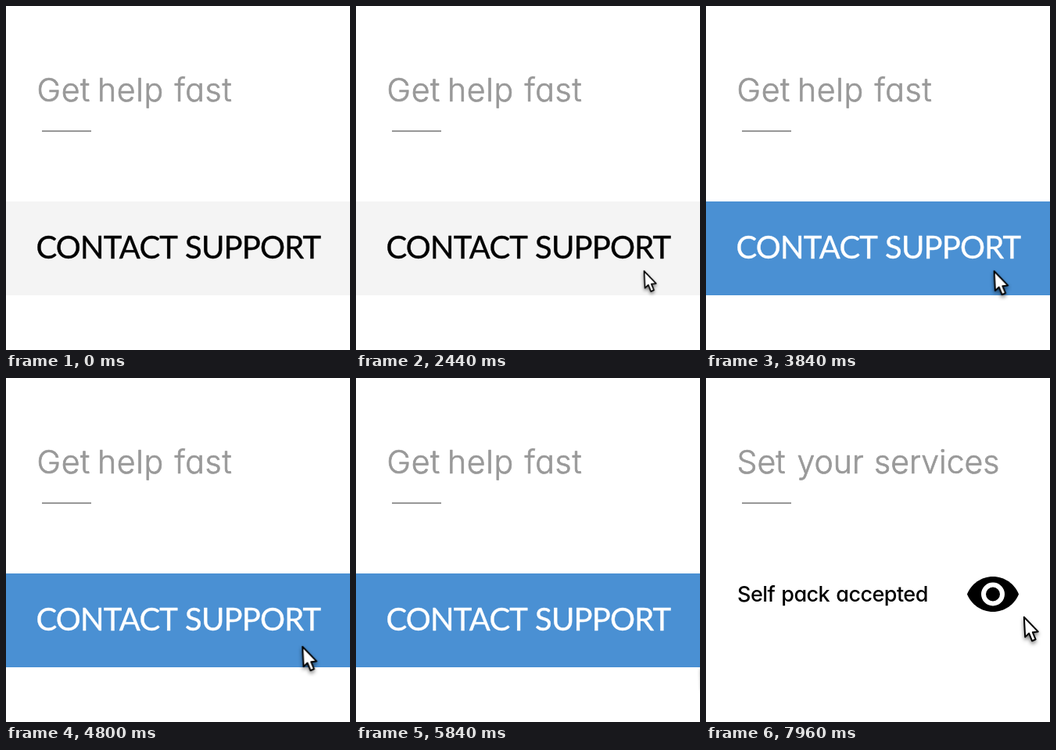
An HTML page that plays this animation: 440 px wide and 440 px high, repeating every 8000 ms.

```html
<!DOCTYPE html>
<html lang="en">
<head>
<meta charset="utf-8">
<title>Get help fast</title>
<style>
  html, body { margin: 0; width: 100%; height: 100%; overflow: hidden; background: #fff; }
  svg { display: block; width: 100vw; height: 100vh; }
  text { stroke-linejoin: round; paint-order: stroke; }

  .title {
    font: 300 41px Inter, sans-serif;
    font-feature-settings: "cv11";
    fill: #999; stroke: #999; stroke-width: .7px;
  }
  .help-title { letter-spacing: .65px; }
  .label {
    font: 400 40px Lato, sans-serif;
    letter-spacing: -.8px;
    stroke-width: .4px;
    animation: label 8s step-end infinite;
  }
  .item {
    font: 500 27px Inter, sans-serif;
    font-feature-settings: "cv11";
    letter-spacing: -.55px;
    word-spacing: 1.5px;
  }
  .bar { animation: bar 8s step-end infinite; }
  .help { animation: help 8s step-end infinite; }
  .services { animation: services 8s step-end infinite; }
  .cursor { animation: travel 8s infinite; }
  .arrow {
    fill: #fff; stroke: #000; stroke-width: 2px; stroke-linejoin: round;
    filter: drop-shadow(0 3px 2.5px rgba(0, 0, 0, .5));
    animation: press 8s ease-in-out infinite;
  }

  @keyframes bar { 0% { fill: #f4f4f4; } 33%, 100% { fill: #4a90d3; } }
  @keyframes label { 0% { fill: #000; stroke: #000; } 33%, 100% { fill: #fff; stroke: #fff; } }
  @keyframes help { 0% { visibility: visible; } 76%, 100% { visibility: hidden; } }
  @keyframes services { 0% { visibility: hidden; } 76%, 100% { visibility: visible; } }

  /* cubic-bezier(1/3, 0, 2/3, 1) is a smoothstep; the last leg is cut off mid-curve */
  @keyframes travel {
    0%, 11.875% { transform: translate(449px, 374px); animation-timing-function: cubic-bezier(.3333, 0, .6667, 1); }
    31.625% { transform: translate(367px, 338px); animation-timing-function: linear; }
    55% { transform: translate(368px, 338.5px); animation-timing-function: cubic-bezier(.3333, 0, .6667, 1); }
    77.5% { transform: translate(450px, 373px); animation-timing-function: step-end; }
    88.75% { transform: translate(444px, 368px); animation-timing-function: cubic-bezier(.3333, 0, .6667, .538); }
    100% { transform: translate(403.5px, 301px); }
  }
  @keyframes press {
    0%, 27% { transform: scale(1); }
    31%, 33% { transform: scale(.85); }
    38% { transform: scale(.95); }
    55%, 100% { transform: scale(1); }
  }
</style>
</head>
<body>
<svg viewBox="0 0 440 440">
  <g class="help">
    <text class="title help-title" y="122"><tspan x="39.5">Get</tspan> <tspan x="117">help</tspan> <tspan x="215.5">fast</tspan></text>
    <rect class="bar" y="250" width="440" height="120"/>
    <text class="label" y="322.5"><tspan x="38.5">CONTACT</tspan> <tspan x="229">SUPPORT</tspan></text>
  </g>
  <g class="services">
    <text class="title" y="122"><tspan x="39.5">Set</tspan> <tspan x="116.5">your</tspan> <tspan x="215">services</tspan></text>
    <text class="item" x="40" y="285.5">Self pack accepted</text>
    <g transform="translate(367 276.5) scale(3)">
      <path d="M-11 0C-9.27-4.39-5-7.5 0-7.5S9.27-4.39 11 0C9.27 4.39 5 7.5 0 7.5S-9.27 4.39-11 0Z"/>
      <circle r="4" fill="none" stroke="#fff" stroke-width="2"/>
    </g>
  </g>
  <rect x="46" y="159" width="63" height="2" fill="#979797"/>
  <g class="cursor">
    <path class="arrow" d="M.8 .8L2.2 26.2L7.2 21.6L11 31.2L15.6 29.4L11.8 20.2L18.8 19.4Z"/>
  </g>
</svg>
</body>
</html>
```
